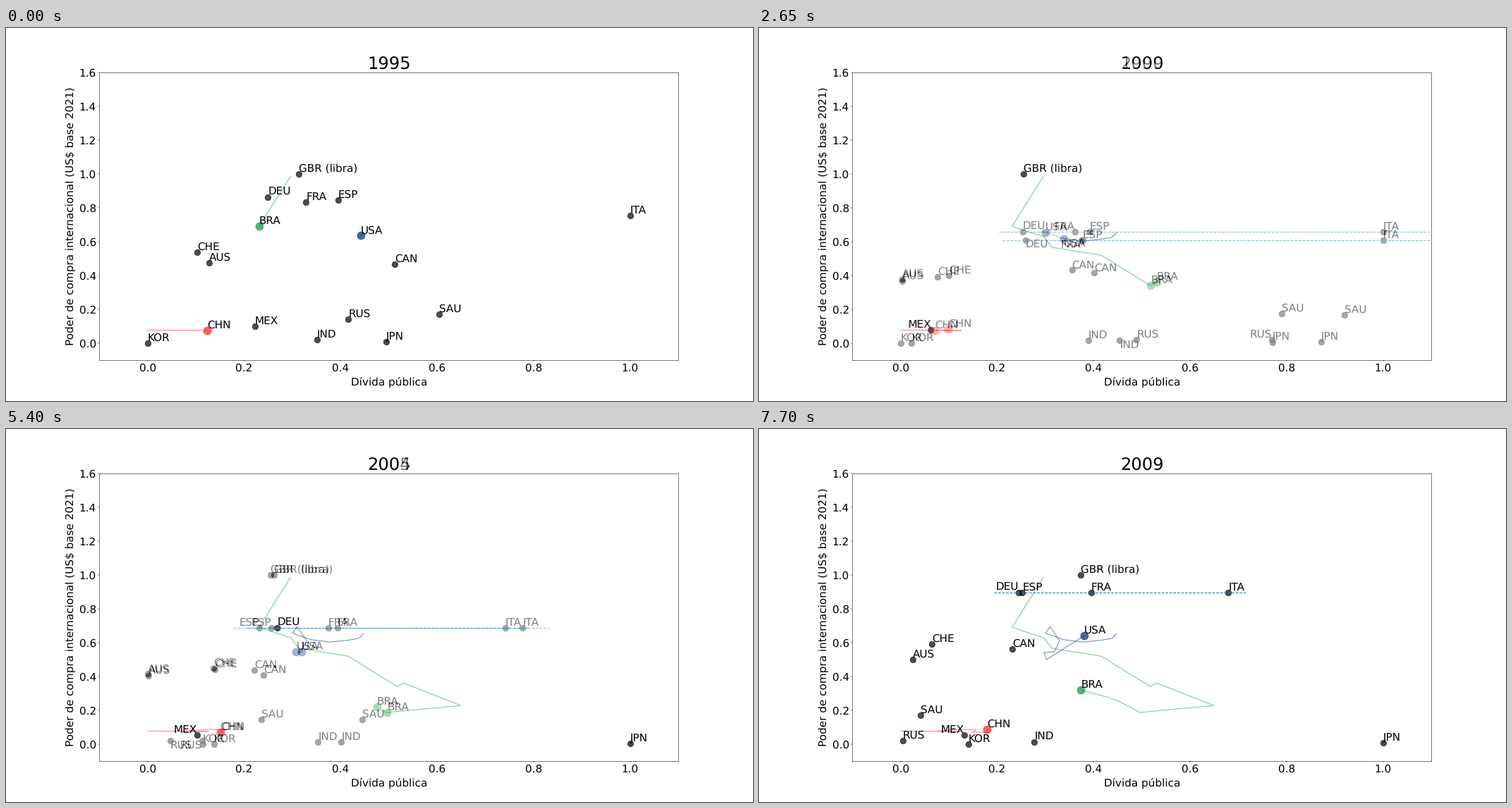
Animation of 1059 by 529 pixels, one loop 8 s. Source, as a matplotlib script:

```python
from itertools import product

import numpy as np
import matplotlib.pyplot as plt
from matplotlib.animation import FuncAnimation
from matplotlib.transforms import Bbox

plt.rcParams.update({"font.family": "DejaVu Sans", "font.size": 22, "text.hinting": "none"})

FIRST_YEAR, N_YEARS, EURO_START = 1995, 15, 4
STEP_MS, HOLD_MS, TICK_MS, LOOP_MS = 550, 450, 50, 8000

# Years since 1995; the trails begin one year earlier
t = np.arange(-1, N_YEARS)


def curve(*points):
    """Straight lines through a few (year, value) points."""
    return np.interp(t, *zip(*points))


def euro(start):
    """Currencies that converge from their own start into the euro."""
    return curve((0, start), (1, .825), (2, .69), (4, .659), (5, .61), (7, .63),
                 (8, .69), (12, .684), (14, .895))


dollar = curve((-1, .6535), (0, .636), (3, .604), (4, .618), (6, .695), (8, .612),
               (9, .546), (11, .543), (12, .5), (14, .641))

# Each country: public debt, purchasing power
COUNTRIES = {
    "GBR (libra)": (curve((2, .313), (4, .255), (9, .255), (12, .278), (14, .3725)),
                    np.ones_like(dollar)),
    "DEU": (curve((0, .249), (2, .268), (4, .253), (7, .27), (11, .268), (14, .2445)),
            euro(.865)),
    "FRA": (curve((0, .328), (2, .372), (4, .3615), (8, .413), (11.5, .345), (14, .3945)),
            euro(.832)),
    "ESP": (curve((0, .395), (2, .421), (5, .377), (9, .256), (12, .182), (14, .252)),
            euro(.846)),
    "ITA": (curve((6, 1), (9, .777), (10, .741), (14, .679)), euro(.754)),
    "CHE": (curve((0, .103), (2, .1225), (4, .077), (7, .1465), (10, .1365), (14, .065)),
            dollar / curve((0, 1.18), (2, 1.45), (5.5, 1.68), (9, 1.24), (14, 1.08))),
    "AUS": (curve((0, .128), (2, .106), (4, .003), (12, 0), (14, .0245)),
            dollar / curve((2, 1.34), (6, 1.93), (9, 1.35), (13, 1.2), (14, 1.28))),
    "CAN": (curve((0, .512), (2, .494), (5, .355), (7, .327), (9, .24), (12, .184), (14, .232)),
            dollar / curve((0, 1.36), (6.5, 1.57), (12, 1.06), (14, 1.14))),
    "MEX": (curve((0, .222), (2, .107), (4.5, .053), (7, .1), (11, .104), (14, .1315)),
            dollar / (6.4 + .4 * t)),
    "RUS": (curve((0, .416), (2, .429), (4, .77), (5, .489), (7, .243), (10, .047), (12, .004)),
            curve((0, .14), (2, .106), (4, .022))),
    "IND": (curve((0, .351), (4, .389), (5, .454), (7, .497), (10, .353), (14, .277)),
            dollar / (32 + t)),
    "JPN": (curve((0, .494), (2, .569), (5, .872), (7, 1)), dollar / 112),
    "SAU": (curve((0, .604), (2, .637), (4, .92), (5, .79), (7, .864), (10, .236),
                  (12, .085), (14, .0415)),
            dollar / 3.75),
    "KOR": (curve((4, 0), (11, .16), (14, .14)), dollar / 1100),
    "BRA": (curve((-1, .296), (0, .231), (1, .297), (2, .3135), (4, .518), (5, .531),
                  (7, .649), (9, .496), (12, .434), (14, .3735)),
            curve((-1, .986), (0, .691), (2, .567), (3, .52), (4, .34), (5, .361),
                  (7, .228), (9, .187), (11, .25), (14, .32))),
    "USA": (curve((-1, .447), (1, .437), (2, .415), (5, .3), (8, .3295), (11, .297),
                  (12, .3025), (14, .3805)),
            dollar),
    "CHN": (curve((-1, 0), (0, .123), (1, .126), (4, .07), (7, .157), (11, .1475), (12, .179)),
            dollar / (8.4 - .08 * t)),
}
EURO_ZONE = ["DEU", "FRA", "ESP", "ITA"]
COLORS = {"BRA": "#009c3b", "USA": "#002776", "CHN": "#ff1c25"}

fig = plt.figure(figsize=(21.18, 10.58), dpi=50)


def place_labels(labels, dots):
    """Turn each label to the corner of its dot that hides the fewest dots,
    then, on the second pass, also the least of the other labels."""
    boxes = [label.get_window_extent() for label in labels]
    corners = list(product(["left", "right"], ["bottom", "top"]))

    def cost(k, corner, count_area):
        labels[k].set(ha=corner[0], va=corner[1])
        box = labels[k].get_window_extent()
        inside = np.all((dots > box.min - .5) & (dots < box.max + .5), axis=1).sum()
        shared = [Bbox.intersection(box, other) for j, other in enumerate(boxes) if j != k]
        area = sum(b.width * b.height for b in shared if b)
        return inside, area * count_area

    for count_area in (False, True):
        for k, label in enumerate(labels):
            ha, va = min(corners, key=lambda corner: cost(k, corner, count_area))
            label.set(ha=ha, va=va)
            boxes[k] = label.get_window_extent()


def draw_year(i):
    ax = fig.add_subplot()
    ax.set(xlim=(-.1, 1.1), ylim=(-.1, 1.6))
    ax.set_xlabel("Dívida pública", labelpad=7.5)
    ax.set_ylabel("Poder de compra internacional (US$ base 2021)", labelpad=6.5)
    ax.set_title(str(FIRST_YEAR + i), fontsize=35, pad=5.3)
    ax.tick_params(length=3, width=.7, pad=3.5)
    for spine in ax.spines.values():
        spine.set_linewidth(.75)

    now = i + 1
    labels, dots = [], []
    for code, (debt, power) in COUNTRIES.items():
        x, y = debt[now], power[now]
        if code in COLORS:
            ax.plot(debt[:now + 1], power[:now + 1], color=COLORS[code], alpha=.55, lw=1.5)
        ax.scatter(x, y, s=250 if code in COLORS else 150,
                   color=COLORS.get(code, "black"), alpha=.7)
        labels.append(ax.text(x, y, code, ha="left", va="bottom"))
        dots.append((x, y))

    if i >= EURO_START:
        zone = [COUNTRIES[code][0][now] for code in EURO_ZONE]
        ax.axhline(euro(0)[now], min(zone), max(zone), color="C0", ls="--", lw=1.5)
    place_labels(labels, ax.transData.transform(dots))


def snapshot(i):
    fig.clear()
    draw_year(i)
    fig.canvas.draw()
    return np.asarray(fig.canvas.buffer_rgba())[..., :3].copy()


charts = [snapshot(i) for i in range(N_YEARS)]
fig.clear()
picture = fig.figimage(charts[0], origin="upper")


def update(frame):
    i, elapsed = divmod(frame * TICK_MS, STEP_MS)
    chart = charts[i]
    if elapsed >= HOLD_MS:
        chart = ((chart.astype(np.uint16) + charts[i + 1]) // 2).astype(np.uint8)
    picture.set_data(chart)
    return [picture]


anim = FuncAnimation(fig, update, frames=LOOP_MS // TICK_MS, interval=TICK_MS,
                     repeat=True, repeat_delay=0)
plt.show()
```
